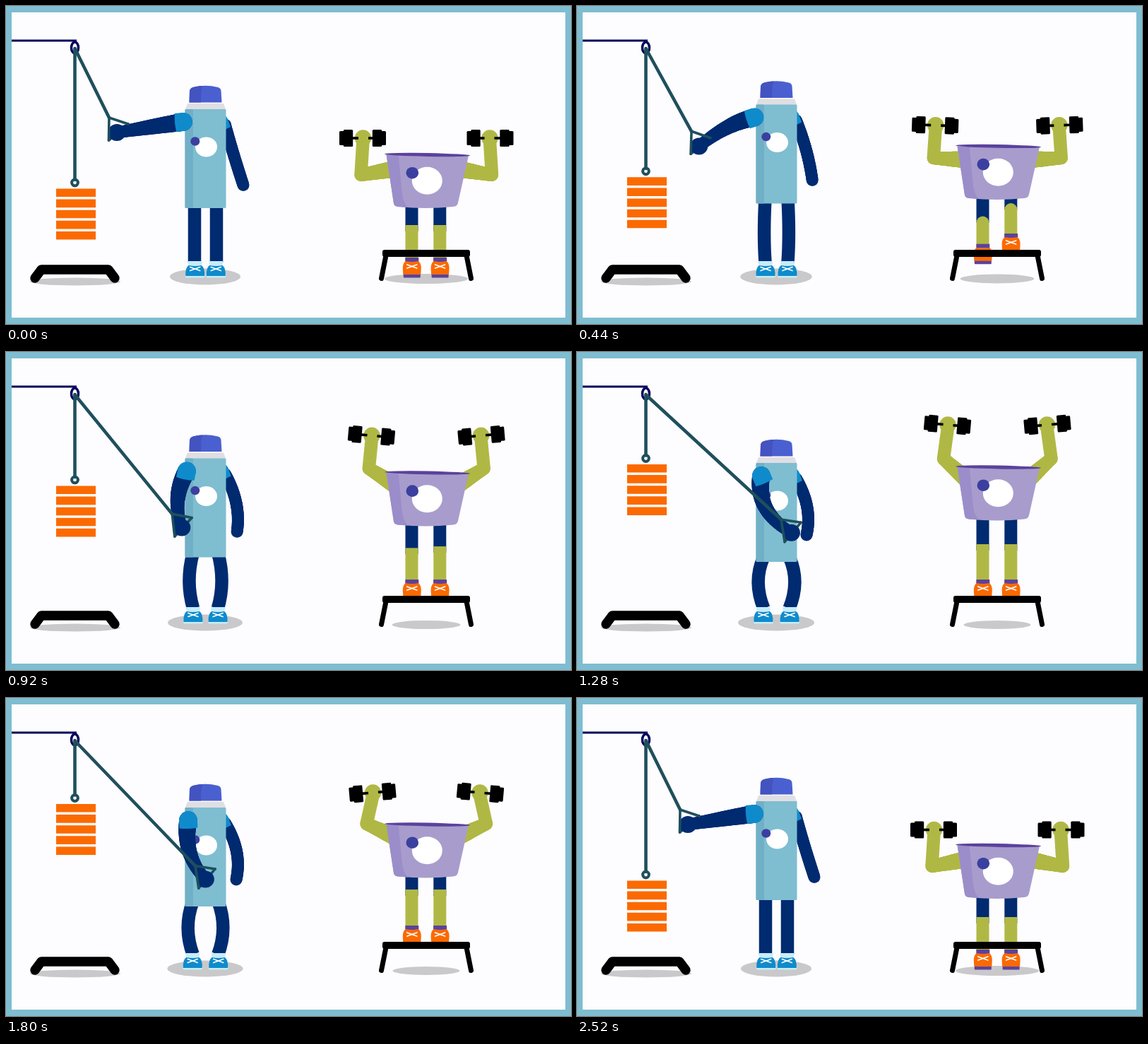
These frames come from a looping animation (800 by 450 pixels, 2560 ms). An HTML page with a canvas:

```html
<!DOCTYPE html>
<html lang="en">
<head>
<meta charset="utf-8">
<title>Workout</title>
<style>
html, body { margin: 0; width: 100%; height: 100%; overflow: hidden; background: #7fbdd0; }
canvas { display: block; }
</style>
</head>
<body>
<canvas id="stage" width="800" height="450"></canvas>
<script>
const ctx = document.getElementById('stage').getContext('2d');
const LOOP = 2560, STEP = 40;
const NAVY = '#002b70', BLUE = '#0f8bcb', GREEN = '#b0b845', ORANGE = '#fb6a00';
const ROPE = '#1f4f5c', PURPLE = '#5b429c', SHADE = '#c9c8ca', PAPER = '#fdfcfe';
const TIMES = [0, 200, 640, 1280, 1800, 2080, 2520];

// Pose values at TIMES; a missing last value repeats the first.
const bottlePose = {
  top: [146, 137.5, 144, 157, 155, 150],
  bow: [0, 0, .42, 1, .9, .17],
  load: [258.5, 258.5, 220.5, 159, 150, 242],
  gripX: [146, 147, 184.5, 289, 268, 149],
  gripY: [158, 136, 215.5, 237, 237.5, 171],
  gripTurn: [0, 5, -4, -10, -9.5, -9.5],
  shoulderX: [251, 251, 252, 261, 258, 251],
  elbowX: [200, 205, 221, 267, 260, 203],
  elbowY: [172, 155, 192, 220, 218, 174],
  sleeve: [175, 180, 138, 67, 88, 178],
  backX: [336, 336, 330, 325, 326, 332],
  backY: [253.5, 245.5, 249.5, 259, 257, 255.5],
  bendX: [322, 322, 332, 334, 335, 328]
};
const cupPose = {
  top: [208.5, 211.5, 181, 161, 177, 200, 206.5],
  handX: [505, 505, 510.5, 524.5, 519, 508.5],
  handY: [187, 195, 141, 103, 134, 176, 186.5],
  elbowX: [502.5, 502.5, 508, 519, 510.5, 506],
  elbowY: [239, 244, 186, 151, 178, 222, 238],
  tilt: [0, -2, 5, 5, -5, -6],
  shadow: [59, 56, 50, 47.5, 47.5, 51.5],
  kneeL: [310, 310, 285, 272, 271, 304],
  kneeR: [310, 281, 278, 272, 271, 285]
};

// Periodic cubic through the keys, softened so that it hardly overshoots.
function sample(keys, t) {
  const n = TIMES.length;
  const value = i => keys[(i + n) % n] ?? keys[0];
  const time = i => TIMES[(i + n) % n] + Math.floor(i / n) * LOOP;
  const slope = i => (value(i + 1) - value(i)) / (time(i + 1) - time(i));
  const tangent = i => {
    const a = slope(i - 1), b = slope(i);
    if (a * b === 0) return 0;
    if (a * b > 0) return 2 * a * b / (a + b);
    const ha = time(i) - time(i - 1), hb = time(i + 1) - time(i);
    return .5 * (a * hb + b * ha) / (ha + hb);
  };
  let i = n - 1;
  while (TIMES[i] > t) i--;
  const h = time(i + 1) - time(i), u = (t - time(i)) / h;
  const u2 = u * u, u3 = u2 * u, blend = 3 * u2 - 2 * u3;
  return value(i) * (1 - blend) + value(i + 1) * blend
    + h * ((u3 - 2 * u2 + u) * tangent(i) + (u3 - u2) * tangent(i + 1));
}

const poseAt = (tracks, t) =>
  Object.fromEntries(Object.entries(tracks).map(([name, keys]) => [name, sample(keys, t)]));

const rad = deg => deg * Math.PI / 180;

function ramp(t, from, to) {
  const u = Math.min(1, Math.max(0, (t - from) / (to - from)));
  return u * u * (3 - 2 * u);
}

function rect(x, y, w, h, color, r = 0) {
  ctx.fillStyle = color;
  ctx.beginPath();
  ctx.roundRect(x, y, w, h, r);
  ctx.fill();
}

function oval(x, y, rx, ry, color, turn = 0) {
  ctx.fillStyle = color;
  ctx.beginPath();
  ctx.ellipse(x, y, rx, ry, turn, 0, 7);
  ctx.fill();
}

function line(points, width, color, cap = 'round') {
  ctx.strokeStyle = color;
  ctx.lineWidth = width;
  ctx.lineCap = cap;
  ctx.lineJoin = 'round';
  ctx.beginPath();
  points.forEach(p => ctx.lineTo(p[0], p[1]));
  ctx.stroke();
}

function shape(path, color) {
  ctx.fillStyle = color;
  ctx.fill(new Path2D(path));
}

function at(x, y, turn, draw) {
  ctx.save();
  ctx.translate(x, y);
  ctx.rotate(turn);
  draw();
  ctx.restore();
}

// Limb along a quadratic curve, its radius running from r0 to r1.
function limb(a, c, b, r0, r1, color) {
  for (let i = 0; i <= 60; i++) {
    const u = i / 60, v = 1 - u, r = r0 * v + r1 * u;
    oval(v * v * a[0] + 2 * u * v * c[0] + u * u * b[0],
         v * v * a[1] + 2 * u * v * c[1] + u * u * b[1], r, r, color);
  }
}

function sleeve(x, y, angle) {
  at(x, y, rad(angle), () => shape('M11-13Q13 0 11 13L0 13A13 13 0 0 1 0-13Z', BLUE));
}

function laces(y) {
  line([[-7, y], [7, y + 5]], 1.7, '#fff');
  line([[7, y], [-7, y + 5]], 1.7, '#fff');
}

function drawScenery() {
  rect(0, 0, 800, 450, '#7fbdd0');
  rect(8, 9, 784, 432, PAPER);
  oval(98, 390, 64, 5.5, SHADE);
  line([[41, 385], [50, 373], [145, 373], [154, 385]], 13.5, '#000');
}

function drawLoad(top) {
  line([[8, 49], [100, 49]], 3, '#06065c', 'butt');
  ctx.strokeStyle = '#06065c';
  ctx.lineWidth = 3.5;
  ctx.beginPath();
  ctx.ellipse(97.5, 59, 5, 8, 0, 0, 7);
  ctx.stroke();
  const ring = top - 8.5;
  line([[97.5, 60], [97.5, ring - 4]], 4.6, ROPE);
  ctx.strokeStyle = ROPE;
  ctx.lineWidth = 4;
  ctx.beginPath();
  ctx.arc(97.5, ring, 4.4, 0, 7);
  ctx.stroke();
  for (let i = 0; i < 5; i++) rect(71, top + i * 15.1, 56, 11.6, ORANGE);
}

function bottleLeg(side, bottom, bow) {
  ctx.save();
  ctx.translate(282.5, 0);
  ctx.scale(side, 1);
  ctx.strokeStyle = NAVY;
  ctx.lineWidth = 18.5;
  ctx.lineCap = 'butt';
  ctx.beginPath();
  ctx.moveTo(15.5 + 3 * bow, bottom - 6);
  ctx.quadraticCurveTo(15.5 + 18 * bow, 325, 15.5 + 2.5 * bow, 363);
  ctx.stroke();
  ctx.restore();
  at(282.5 + side * (14.8 + 3.8 * bow), 0, 0, () => {
    shape('M-10 361L10 361L9 369L-9 369Z', '#c6ecf8');
    rect(-14, 378, 28, 6.5, '#c6ecf8', 2);
    shape('M-9 367Q0 369 9 367Q14 370 13.5 382L-13.5 382Q-14 370-9 367Z', BLUE);
    laces(369.5);
  });
}

function drawBottle(p) {
  const { top, bow } = p, bottom = top + 140;
  oval(282, 383, 50 + 4 * bow, 11.5, SHADE);
  bottleLeg(-1, bottom, bow);
  bottleLeg(1, bottom, bow);

  limb([310, top + 22], [p.bendX, (top + 22 + p.backY) / 2], [p.backX, p.backY], 8.7, 8.5, NAVY);
  sleeve(302 + bow, top + 19, 70);

  at(0, top, 0, () => {
    shape('M257-8L308-8L311.5 1L253.5 1Z', '#dfdee3');
    shape('M259.5-9.5L260-26Q261-30 265-31Q282-35.5 300-31Q304-30 304.5-26L305.5-9.5Z', '#4a60d0');
    shape('M259.5-9.5L260-26Q261-30 265-31Q270-32.5 279-33Q276-30 276-9.5Z', '#4353c0');
    rect(253.5, 0, 58, 140, '#7fbdd1', 1.5);
    rect(253.5, 0, 11.5, 140, '#70b0c7', 1.5);
    oval(283.5, 53.5, 15.5, 14, '#fff');
    oval(267.8, 45.5, 6.5, 6.2, '#3b3f9f');
  });

  const turn = rad(p.gripTurn), cos = Math.cos(turn), sin = Math.sin(turn);
  const onGrip = (x, y) => [p.gripX + x * cos - y * sin, p.gripY + x * sin + y * cos];
  const apex = onGrip(0, 0), low = onGrip(-.5, 32), far = onGrip(27, 9), hand = onGrip(11, 21);
  line([low, far], 3.6, ROPE);

  const shoulder = [p.shoulderX, top + 18];
  const bend = [2 * p.elbowX - (shoulder[0] + hand[0]) / 2, 2 * p.elbowY - (shoulder[1] + hand[1]) / 2];
  limb(shoulder, bend, hand, 12.8, 8, NAVY);
  oval(hand[0], hand[1], 12.5, 12, NAVY);
  sleeve(shoulder[0], shoulder[1], p.sleeve);

  line([[98, 61], apex], 4.6, ROPE);
  line([low, apex, far], 3.6, ROPE);
}

function cupArm(p) {
  const { handX: x, handY: y } = p;
  const shoulder = [552, p.top + 22 - (211 - p.top) * .05];
  line([[x + .5, y + 4], [p.elbowX, p.elbowY], shoulder], 18.5, GREEN);
  limb([p.elbowX, p.elbowY], [(p.elbowX + shoulder[0]) / 2, (p.elbowY + shoulder[1]) / 2], shoulder, 9, 12, GREEN);
  oval(x + .5, y, 11.7, 11.7, GREEN);
  at(x, y, rad(p.tilt), () => {
    line([[-16, 0], [-6, 0]], 3.6, '#000', 'butt');
    line([[8, 0], [16, 0]], 3.6, '#000', 'butt');
    for (const side of [-1, 1]) {
      rect(side * 20.5 - 6.7, -12, 13.4, 24, '#000', 1.5);
      rect(side * 29.5 - 3.5, -10, 7, 20, '#000', 1.5);
    }
  });
}

function cupShank(x, knee, lift, round) {
  const foot = 384 - 34 * lift;
  rect(x - 9, knee, 18, foot - 27 - knee, GREEN, round ? [9, 9, 0, 0] : 0);
  at(x + .3, foot, 0, () => {
    rect(-9.5, -28, 19, 6, PURPLE);
    rect(-12, -5, 24, 5.5, PURPLE, 1);
    shape('M-9-23Q0-21 9-23Q13-20 13-13L12.5-4L-12.5-4L-13-13Q-13-20-9-23Z', ORANGE);
    laces(-18);
  });
}

function drawCup(p, t) {
  oval(595, 386, p.shadow, 6 + (p.shadow - 47) * .08, SHADE);
  ctx.save();
  cupArm(p);
  ctx.translate(1190.5, 0);
  ctx.scale(-1, 1);
  cupArm(p);
  ctx.restore();

  const liftL = ramp(t, 320, 540) - ramp(t, 1950, 2180);
  const liftR = ramp(t, 60, 280) - ramp(t, 2200, 2430);
  const bentL = t > 320 && t < 560;
  const bentR = t > 60 && t < 560 || t > 1950 && t < 2430;
  const hip = p.top + 65;
  rect(565.5, hip, 18, Math.max(0, p.kneeL + 9 - hip), NAVY);
  rect(605.3, hip, 18, Math.max(0, p.kneeR + 9 - hip), NAVY);

  at(0, p.top, 0, () => {
    const body = 'M538.5 2L549 71Q550 75 555 75.5Q595 79.5 633 75.5Q639 75 640 70L655 3Z';
    ctx.save();
    ctx.clip(new Path2D(body));
    rect(530, 0, 130, 80, '#a89ccd');
    shape('M530 0L555.5 0L561 58Q563 73 573 80L530 80Z', '#9b8dc9');
    ctx.restore();
    oval(596.5, 2, 60.5, 2.4, PURPLE, .018);
    oval(596.3, 38.7, 21.5, 19.5, '#fff');
    oval(575.3, 27.7, 8.8, 8.3, '#3b3f9f');
  });

  cupShank(574.5, p.kneeL, liftL, bentL);
  cupShank(614.3, p.kneeR, liftR, bentR);

  rect(533, 345, 124, 10, '#000', 3);
  line([[538, 353], [531.5, 385.5]], 7, '#000');
  line([[652, 353], [658.5, 385.5]], 7, '#000');
}

const start = performance.now();

function frame() {
  const t = Math.floor((performance.now() - start) / STEP) * STEP % LOOP;
  const bottle = poseAt(bottlePose, t);
  drawScenery();
  drawLoad(Math.min(258.5, bottle.load));
  drawBottle(bottle);
  drawCup(poseAt(cupPose, t), t);
  requestAnimationFrame(frame);
}
frame();
</script>
</body>
</html>
```
